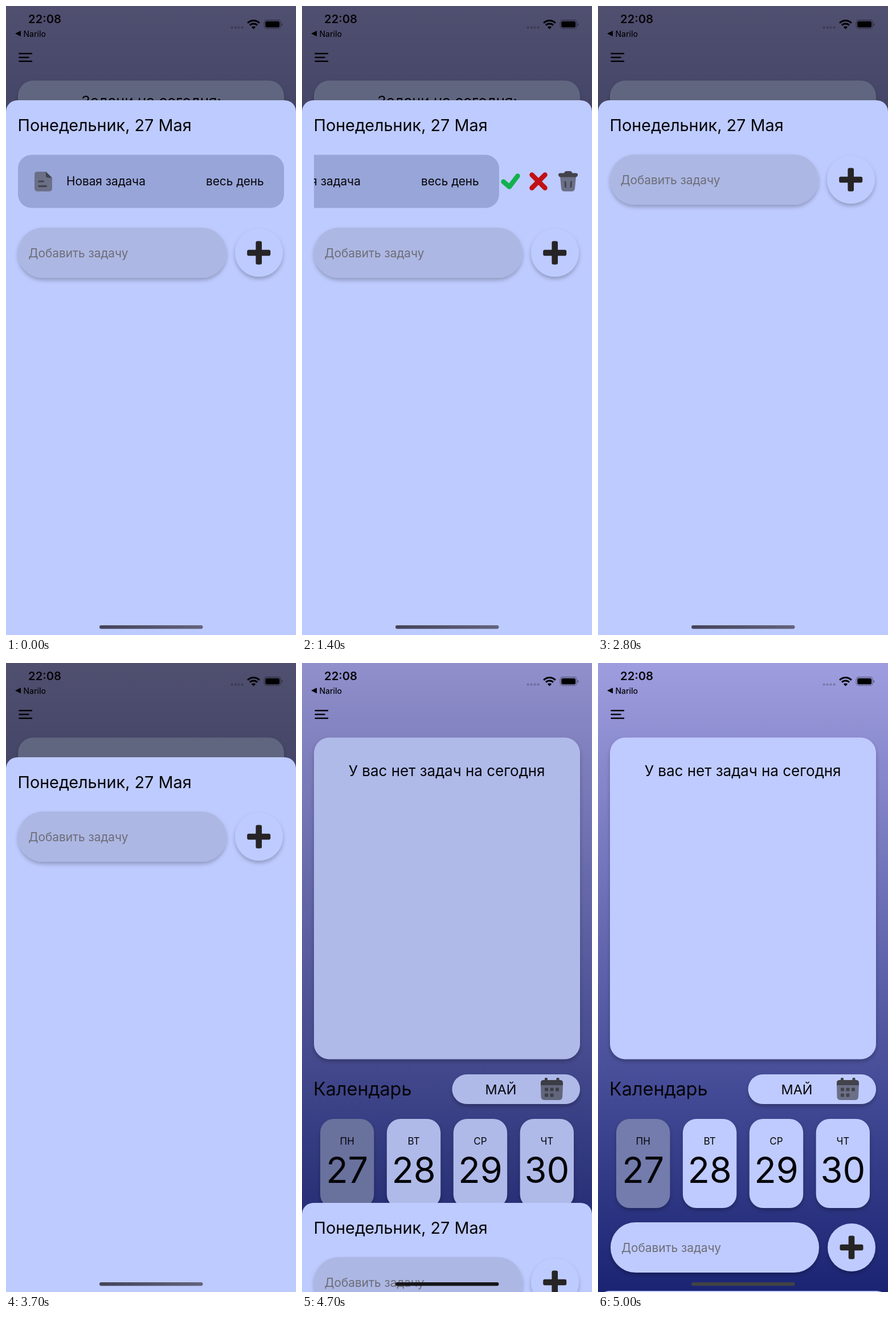
Recreate the animation shown at these times as an HTML page. Size 509x1101 px, loop 5.1 s.

```html
<!DOCTYPE html>
<html lang="ru">
<head>
<meta charset="utf-8">
<title>Планировщик задач</title>
<style>
  html, body { margin: 0; width: 100%; height: 100%; overflow: hidden; background: #1b2674; }
  svg { display: block; width: 100%; height: 100%; }
  text { font-family: Inter, Roboto, sans-serif; fill: #050508; }
  .hint { font-size: 20.8px; fill: #6c6d77; }
  .task { font-size: 20.8px; }
  .mid { text-anchor: middle; }
  .pale { fill: #bfcbff; }
  .dark { fill: #42434b; }
  .grey { fill: #6b7088; }
</style>
</head>
<body>
<svg viewBox="0 0 509 1101">
  <defs>
    <linearGradient id="sky" x1="0" y1="0" x2="0" y2="1">
      <stop offset="0" stop-color="#9e9ddf"/>
      <stop offset="1" stop-color="#1a2473"/>
    </linearGradient>
    <linearGradient id="bar" x1="0" y1="0" x2="1" y2="0.03">
      <stop offset="0" stop-color="#43435a"/>
      <stop offset="1" stop-color="#62637c"/>
    </linearGradient>
    <filter id="shadow" x="-20%" y="-20%" width="140%" height="150%">
      <feDropShadow dx="0" dy="4" stdDeviation="3.5" flood-color="#000" flood-opacity="0.25"/>
    </filter>
    <clipPath id="row"><rect x="21" y="255" width="467" height="104"/></clipPath>
    <g id="plus" fill="#262425">
      <rect x="-20.5" y="-5.3" width="41" height="10.6" rx="3"/>
      <rect x="-5.3" y="-20.5" width="10.6" height="41" rx="3"/>
    </g>
  </defs>

  <g id="home">
    <rect width="509" height="1101" fill="url(#sky)"/>
    <path d="M23.5 83.3H45M23.5 90H39.5M23.5 96.8H45" stroke="#08080c" stroke-width="2.5" stroke-linecap="round"/>
    <rect class="pale" x="21" y="130.5" width="467" height="563" rx="27" filter="url(#shadow)"/>
    <text id="today" class="mid" x="255" y="176" font-size="26">Задачи на сегодня:</text>
    <text id="empty" class="mid" x="254" y="198" font-size="26">У вас нет задач на сегодня</text>
    <text x="20" y="757" font-size="32.4">Календарь</text>
    <rect class="pale" x="263.5" y="720" width="224.5" height="52" rx="26" filter="url(#shadow)"/>
    <text class="mid" x="349" y="754.5" font-size="23.4">МАЙ</text>
    <g id="calendar">
      <path class="grey" d="M419 738h39l-1 22q-.5 5-6 5h-25q-6 0-6.500-5z"/>
      <path class="dark" d="M419 739v-4q0-5 5-5h29q5 0 5 5v4z"/>
      <rect class="dark" x="426" y="726" width="5" height="8" rx="1.500"/>
      <rect class="dark" x="446.500" y="726" width="5" height="8" rx="1.500"/>
    </g>
    <g id="days"></g>
    <rect class="pale" x="22" y="979" width="366" height="88" rx="44" filter="url(#shadow)"/>
    <text class="hint" x="41" y="1030.500">Добавить задачу</text>
    <circle class="pale" cx="445" cy="1023" r="42" filter="url(#shadow)"/>
    <use href="#plus" x="445" y="1023"/>
  </g>

  <rect id="dim" width="509" height="1101"/>

  <g id="sheet">
    <rect x="0" y="165" width="509" height="1200" rx="20" fill="#becbff"/>
    <text x="20.500" y="219" font-size="28.800">Понедельник, 27 Мая</text>

    <g id="item" clip-path="url(#row)">
      <path d="M353.500 307.500L364 316.500L378.500 297.500" fill="none" stroke="#12b14d" stroke-width="8.500" stroke-linecap="round" stroke-linejoin="round"/>
      <path d="M403.500 295.500L426.500 318.500M426.500 295.500L403.500 318.500" stroke="#c11014" stroke-width="8.500" stroke-linecap="round"/>
      <path class="grey" d="M453 298h28l-2 21q-.5 5.500-6 5.500h-12q-5.500 0-6-5.500z"/>
      <path class="dark" d="M453 292.500h7q1-3.500 4-3.500h6.500q3 0 4 3.500h6.500q3 0 3 3t-3.500 4h-27q-3.500-1-3.500-4t3-3z"/>
      <path d="M462 308l.6 8.500M472.500 308l-.6 8.500" stroke="#42434b" stroke-width="3" stroke-linecap="round"/>
      <g id="card">
        <rect x="21" y="260.500" width="467" height="93" rx="24" fill="#98a5d9"/>
        <path class="grey" d="M55 290h14.500v6q0 4.500 4.500 4.500h7v18.500q0 5.500-5.500 5.500h-20q-5.500 0-5.500-5.500v-23.500q0-5.500 5-5.500z"/>
        <path class="dark" d="M69.500 289.500l11.500 11.300h-6.500q-5 0-5-5z"/>
        <path d="M58 307h7.500M58 315.300h12.500" stroke="#42434b" stroke-width="3.200" stroke-linecap="round"/>
        <text class="task" x="106" y="314">Новая задача</text>
        <text class="task" x="351" y="314">весь день</text>
      </g>
    </g>

    <g id="add">
      <rect x="21" y="388" width="366" height="88" rx="44" fill="#adb7e3" filter="url(#shadow)"/>
      <text class="hint" x="39.500" y="439.500">Добавить задачу</text>
      <circle cx="444" cy="432" r="42" fill="#becbff" filter="url(#shadow)"/>
      <use href="#plus" x="443.700" y="432"/>
    </g>
  </g>

  <g id="status">
    <text x="39" y="30" font-size="20.300" font-weight="600">22:08</text>
    <path d="M16 48.300L26 43.300V53.300z"/>
    <text x="30.500" y="53.500" font-size="14" font-weight="500">Narilo</text>
    <g id="signal" fill-opacity="0.22"></g>
    <path d="M434.500 40.500l-3.600-3.600a5.100 5.100 0 0 1 7.200 0z"/>
    <path id="waves" fill="none" stroke="#000" stroke-width="3"/>
    <rect x="453.200" y="24.700" width="29" height="14.800" rx="4.500" fill="none" stroke="#000" stroke-opacity="0.400" stroke-width="1.200"/>
    <rect x="455.200" y="26.700" width="25" height="10.800" rx="2.800"/>
    <path d="M483.700 29.700q1.800.6 1.800 2.400t-1.800 2.400z" fill-opacity="0.450"/>
  </g>
  <rect id="indicator" x="164" y="1084" width="181.500" height="6.200" rx="3.100"/>
</svg>
<script>
const LOOP = 5100, STEP = 100;
const DELETED = 2800, CLOSING = 4600;
const TOP = 165, ROW_SHIFT = 128;

// [time, value] points joined by straight lines
const swipe = [[1000, 0], [1100, 8], [1200, 42], [1300, 98], [1400, 142], [1500, 154], [1600, 158], [1800, 160.5]];
const sheetTop = [[4500, TOP], [4600, 551], [4700, 945], [4800, 1063], [4900, 1092], [5000, 1099]];
const shade = [[4500, 0.497], [4600, 0.333], [4700, 0.088], [4800, 0.022], [4900, 0.004], [5000, 0]];
const glow = [[4600, 0], [4700, 22], [5000, 66]];

const $ = id => document.getElementById(id);
const show = (id, on) => $(id).setAttribute("display", on ? "inline" : "none");
const shift = (id, x, y) => $(id).setAttribute("transform", `translate(${x} ${y})`);

function at(points, t) {
  if (t <= points[0][0]) return points[0][1];
  for (let i = 1; i < points.length; i++) {
    const [t0, a] = points[i - 1], [t1, b] = points[i];
    if (t <= t1) return a + (b - a) * (t - t0) / (t1 - t0);
  }
  return points[points.length - 1][1];
}

function build() {
  $("days").innerHTML = ["ПН", "ВТ", "СР", "ЧТ"].map((name, i) => {
    const x = 32 + 116.9 * i, mid = x + 47.2;
    return `<rect x="${x}" y="798" width="94.3" height="156" rx="24"
        fill="${i ? "#bfcbff" : "#737cac"}" filter="url(#shadow)"/>
      <text class="mid" x="${mid}" y="843.3" font-size="17">${name}</text>
      <text class="mid" x="${mid}" y="910" font-size="63">${27 + i}</text>`;
  }).join("");

  for (let i = 0; i < 5; i++) {
    const x = 426 + 9.5 * (i % 3), y = i < 3 ? 743.5 : 753.5;
    $("calendar").insertAdjacentHTML("beforeend",
      `<rect class="dark" x="${x}" y="${y}" width="6" height="6" rx="1.3"/>`);
  }

  $("signal").innerHTML = [0, 1, 2, 3].map(i =>
    `<circle cx="${396.6 + 6 * i}" cy="37.7" r="2.1"/>`).join("");

  $("waves").setAttribute("d", [9.3, 14.6].map(r => {
    const d = r * Math.SQRT1_2;
    return `M${434.5 - d} ${40.2 - d}A${r} ${r} 0 0 1 ${434.5 + d} ${40.2 - d}`;
  }).join(""));
}

function render(t) {
  const gone = t >= DELETED;
  show("item", !gone);
  show("today", !gone);
  show("empty", t >= CLOSING);
  shift("card", -at(swipe, t), 0);
  shift("add", 0, gone ? -ROW_SHIFT : 0);
  shift("sheet", 0, at(sheetTop, t) - TOP);
  $("dim").setAttribute("opacity", at(shade, t));
  const g = Math.round(at(glow, t));
  $("indicator").setAttribute("fill", t < CLOSING ? "url(#bar)" : `rgb(${g},${g},${g + 3})`);
}

function tick() {
  const t = performance.now() % LOOP;
  render(Math.floor(t / STEP) * STEP);
  requestAnimationFrame(tick);
}

build();
render(0);
requestAnimationFrame(tick);
</script>
</body>
</html>
```
